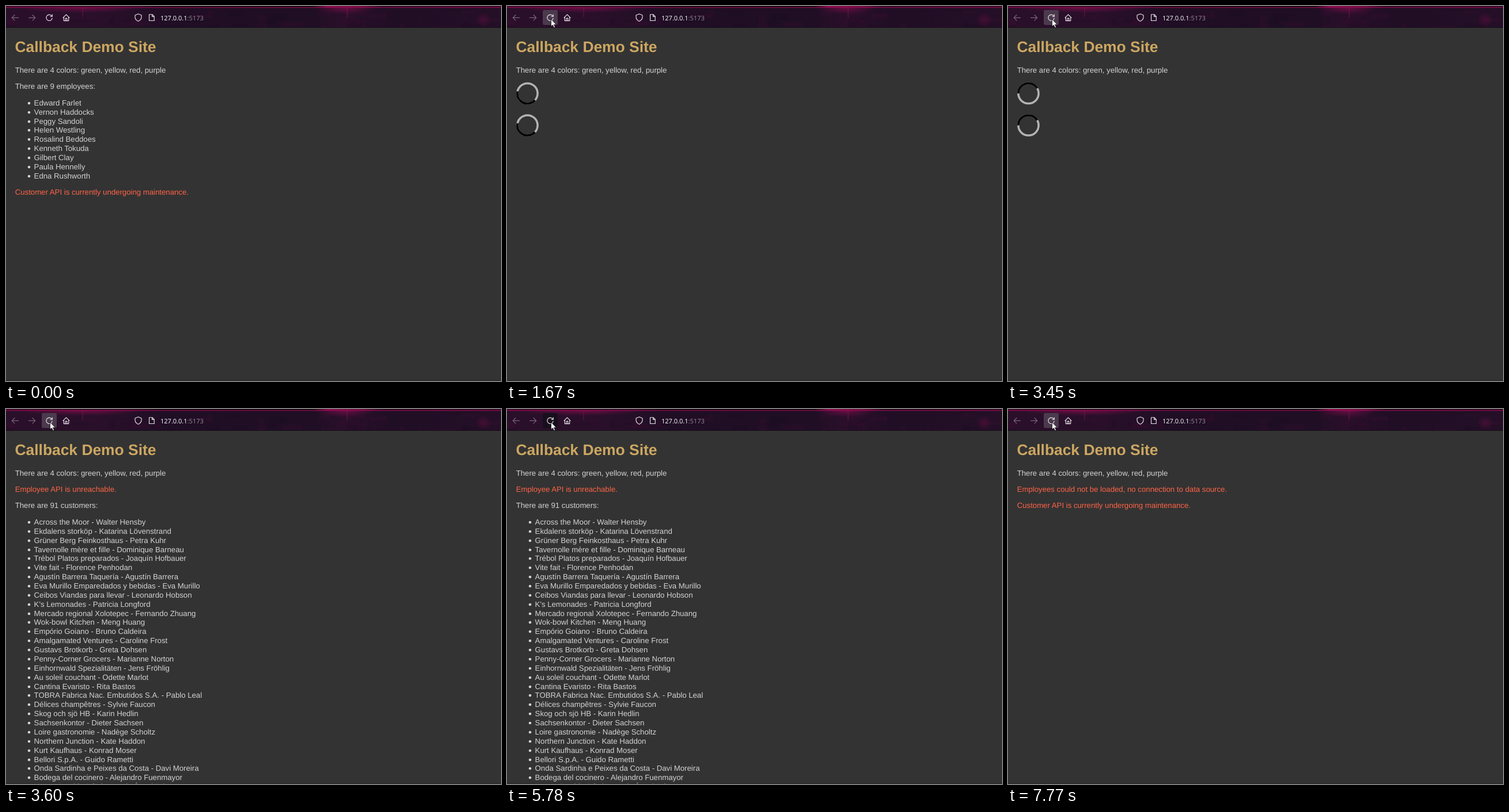
Write an HTML page that moves like this. It is 859 by 652 pixels and loops after 8000 ms.

```html
<!DOCTYPE html>
<html lang="en">
<head>
<meta charset="utf-8">
<title>Callback Demo Site</title>
<style>
  html, body { margin: 0; width: 100%; height: 100%; overflow: hidden; background: #333; }
  svg { display: block; text-rendering: geometricPrecision; }
  text { font: 13.2px "Liberation Sans", Arial, sans-serif; fill: #d3d3d3; }
  .title { font-size: 26.4px; font-weight: bold; fill: #cda762; }
  .error { fill: #ff6347; }
  .address { font: 11px "Noto Sans", sans-serif; fill: #f4eff4; }
  .icon { fill: none; stroke: #e9e3ea; stroke-width: 1.15; stroke-linecap: round; stroke-linejoin: round; }
  .dim { stroke: #77677a; }
</style>
</head>
<body>
<svg width="859" height="652" viewBox="0 0 859 652">
  <defs>
    <linearGradient id="theme">
      <stop offset="0" stop-color="#2a0f2a"/>
      <stop offset=".2" stop-color="#290f29"/>
      <stop offset=".32" stop-color="#200e25"/>
      <stop offset=".62" stop-color="#1f0e24"/>
      <stop offset=".68" stop-color="#2b0f2a"/>
      <stop offset=".78" stop-color="#200e25"/>
      <stop offset="1" stop-color="#240f27"/>
    </linearGradient>
    <linearGradient id="strip">
      <stop offset="0" stop-color="#3c0628"/>
      <stop offset=".25" stop-color="#330624"/>
      <stop offset=".32" stop-color="#12060f"/>
      <stop offset=".62" stop-color="#12060f"/>
      <stop offset=".65" stop-color="#8a0b50"/>
      <stop offset=".72" stop-color="#6c0a42"/>
      <stop offset=".76" stop-color="#25071c"/>
      <stop offset="1" stop-color="#300623"/>
    </linearGradient>
    <radialGradient id="glow">
      <stop offset="0" stop-color="#8f0d54" stop-opacity=".6"/>
      <stop offset="1" stop-color="#8f0d54" stop-opacity="0"/>
    </radialGradient>
    <clipPath id="bar"><path d="M0 0H859V37H0Z"/></clipPath>
  </defs>

  <rect width="859" height="652" fill="#333"/>
  <g clip-path="url(#bar)">
    <rect width="859" height="38" fill="url(#theme)"/>
    <g id="patches"></g>
    <ellipse cx="130" cy="3" rx="110" ry="9" fill="url(#glow)"/>
    <ellipse cx="588" cy="3" rx="52" ry="11" fill="url(#glow)"/>
    <ellipse cx="828" cy="24" rx="14" ry="13" fill="url(#glow)" opacity=".5"/>
    <path d="M133 3V19M592 3V20" stroke="#8a1757" stroke-opacity=".5" stroke-width="1.5"/>
    <rect width="859" height="3" fill="url(#strip)"/>
    <rect y="2" width="859" height="1.2" fill="#940b4b"/>
  </g>
  <rect y="37" width="859" height="1" fill="#171019"/>
  <rect y="650.5" width="859" height="1.5" fill="#2b2b2b"/>

  <rect id="button" x="62" y="7" width="26" height="26" rx="3"/>
  <g class="icon">
    <path class="dim" d="M21.5 20.3H10.3M15 15.5L10.2 20.3L15 25.1M39.5 20.3H50.7M46 15.5L50.8 20.3L46 25.1"/>
    <path d="M79.4 17.4A5.2 5.2 0 1 0 80.2 21.2M80.3 14.8V18.2H76.8"/>
    <path d="M99 20.3L104.5 14.8L110 20.3M100.3 19.4V25.6H108.7V19.4M103.2 25.4V21.4H105.8V25.4"/>
    <path d="M229.5 13.8L235 16V19.3C235 22.7 232.8 25 229.5 26.6C226.2 25 224 22.7 224 19.3V16Z"/>
    <path d="M248.5 14.7H253.8L257.2 18.1V25.5H248.5ZM253.6 14.9V18.3H257"/>
  </g>
  <text class="address" x="268" y="24.5">127.0.0.1<tspan fill="#91858f">:5173</tspan></text>

  <text class="title" x="15.5" y="80">Callback Demo Site</text>
  <g id="views"></g>
  <path id="cursor" d="M0 0V12.6L2.9 9.9L5 14.6L7 13.7L5 9.2H8.9Z" fill="#fff" stroke="#111" stroke-width=".8"/>
</svg>

<script>
const LOOP = 8000, STEP = 137.5, LINE = 15.87, PARAGRAPH = 28.1, FIRST_LINE = 116;
const SPIN_PER_STEP = 66;

const employees = ["Edward Farlet", "Vernon Haddocks", "Peggy Sandoli", "Helen Westling",
  "Rosalind Beddoes", "Kenneth Tokuda", "Gilbert Clay", "Paula Hennelly", "Edna Rushworth"];

const customers = [
  "Across the Moor - Walter Hensby",
  "Ekdalens storköp - Katarina Lövenstrand",
  "Grüner Berg Feinkosthaus - Petra Kuhr",
  "Tavernolle mère et fille - Dominique Barneau",
  "Trébol Platos preparados - Joaquín Hofbauer",
  "Vite fait - Florence Penhodan",
  "Agustín Barrera Taquería - Agustín Barrera",
  "Eva Murillo Emparedados y bebidas - Eva Murillo",
  "Ceibos Viandas para llevar - Leonardo Hobson",
  "K's Lemonades - Patricia Longford",
  "Mercado regional Xolotepec - Fernando Zhuang",
  "Wok-bowl Kitchen - Meng Huang",
  "Empório Goiano - Bruno Caldeira",
  "Amalgamated Ventures - Caroline Frost",
  "Gustavs Brotkorb - Greta Dohsen",
  "Penny-Corner Grocers - Marianne Norton",
  "Einhornwald Spezialitäten - Jens Fröhlig",
  "Au soleil couchant - Odette Marlot",
  "Cantina Evaristo - Rita Bastos",
  "TOBRA Fabrica Nac. Embutidos S.A. - Pablo Leal",
  "Délices champêtres - Sylvie Faucon",
  "Skog och sjö HB - Karin Hedlin",
  "Sachsenkontor - Dieter Sachsen",
  "Loire gastronomie - Nadège Scholtz",
  "Northern Junction - Kate Haddon",
  "Kurt Kaufhaus - Konrad Moser",
  "Bellori S.p.A. - Guido Rametti",
  "Onda Sardinha e Peixes da Costa - Davi Moreira",
  "Bodega del cocinero - Alejandro Fuenmayor",
  "Moras Comida Rústica - Luis Ángel Prieto"
];

const byId = id => document.getElementById(id);

function add(parent, tag, attributes = {}, content = "") {
  const node = document.createElementNS("http://www.w3.org/2000/svg", tag);
  for (const key in attributes) node.setAttribute(key, attributes[key]);
  node.textContent = content;
  return parent.appendChild(node);
}

// Each view stacks paragraphs (strings, "!" marks an error) and lists (arrays).
// Baselines snap to whole pixels.
function addView(blocks) {
  const view = add(byId("views"), "g");
  let y = FIRST_LINE;
  for (const block of blocks) {
    if (Array.isArray(block)) {
      y += .6;
      block.forEach((item, i) => {
        const baseline = Math.round(y + i * LINE);
        add(view, "circle", { cx: 40, cy: baseline - 4, r: 2.3, fill: "#d3d3d3" });
        add(view, "text", { x: 48.6, y: baseline }, item);
      });
      y += (block.length - 1) * LINE + PARAGRAPH;
    } else {
      const isError = block[0] === "!";
      const style = { x: 15.7, y: Math.round(y), class: isError ? "error" : "" };
      add(view, "text", style, isError ? block.slice(1) : block);
      y += PARAGRAPH;
    }
  }
  return view;
}

const colors = "There are 4 colors: green, yellow, red, purple";
const maintenance = "!Customer API is currently undergoing maintenance.";
const views = {
  employees: addView([colors, "There are 9 employees:", employees, maintenance]),
  customers: addView([colors, "!Employee API is unreachable.", "There are 91 customers:", customers]),
  errors: addView([colors, "!Employees could not be loaded, no connection to data source.", maintenance]),
  loading: addView([colors])
};

const arcs = [152, 207.5].map(cy => {
  const ring = { cx: 35.5, cy, r: 17.6, fill: "none", "stroke-width": 3.5 };
  add(views.loading, "circle", { ...ring, stroke: "#b4b4b4" });
  return { cy, node: add(views.loading, "circle", { ...ring, stroke: "#000", pathLength: 360 }) };
});

let seed = 7;
const random = () => (seed = seed * 16807 % 2147483647) / 2147483647;
for (let i = 0; i < 40; i++) {
  add(byId("patches"), "rect", {
    x: random() * 859, y: 3 + random() * 32, width: 6 + random() * 32, height: 3 + random() * 11, rx: 2,
    fill: random() < .5 ? "#4a1038" : "#180d20", opacity: .18
  });
}

// Spinner pose: the black arc starts at angle `tail` on step `at` after the click.
const loads = [
  { click: 1400, done: 3600, before: "employees", after: "customers", tail: -60, arc: 150, at: 9 },
  { click: 5660, done: 7770, before: "customers", after: "errors", tail: 197, arc: 164, at: 8 }
];

function drawSpinners(load, step) {
  const angle = load.tail - 90 + (step - load.at) * SPIN_PER_STEP;
  for (const { cy, node } of arcs) {
    node.setAttribute("stroke-dasharray", `${load.arc} ${360 - load.arc}`);
    node.setAttribute("transform", `rotate(${angle} 35.5 ${cy})`);
  }
}

function drawCursor(t, pressed) {
  const progress = Math.min(6, Math.floor((t - 310) / 135)) / 6;
  const eased = progress * progress * (3 - 2 * progress);
  const x = 375.5 + (76.5 - 375.5) * eased, y = 481.5 + (23 - 481.5) * eased;
  byId("cursor").setAttribute("transform", `translate(${x} ${y})`);
  byId("cursor").style.display = t < 310 ? "none" : "";
  const button = byId("button");
  button.style.display = t >= 310 && eased > .99 ? "" : "none";
  button.setAttribute("fill", pressed ? "#170f1c" : "#4b3a4d");
}

function draw(now) {
  const t = now % LOOP;
  const load = t < loads[1].click ? loads[0] : loads[1];
  const step = Math.floor((t - load.click) / STEP + .02);
  const pressed = step === 0;
  const current = step < 1 ? load.before : t < load.done ? "loading" : load.after;
  for (const name in views) views[name].style.display = name === current ? "" : "none";
  if (current === "loading") drawSpinners(load, step);
  drawCursor(t, pressed);
}

const start = performance.now();
function tick() {
  draw(performance.now() - start);
  requestAnimationFrame(tick);
}
tick();
</script>
</body>
</html>
```
